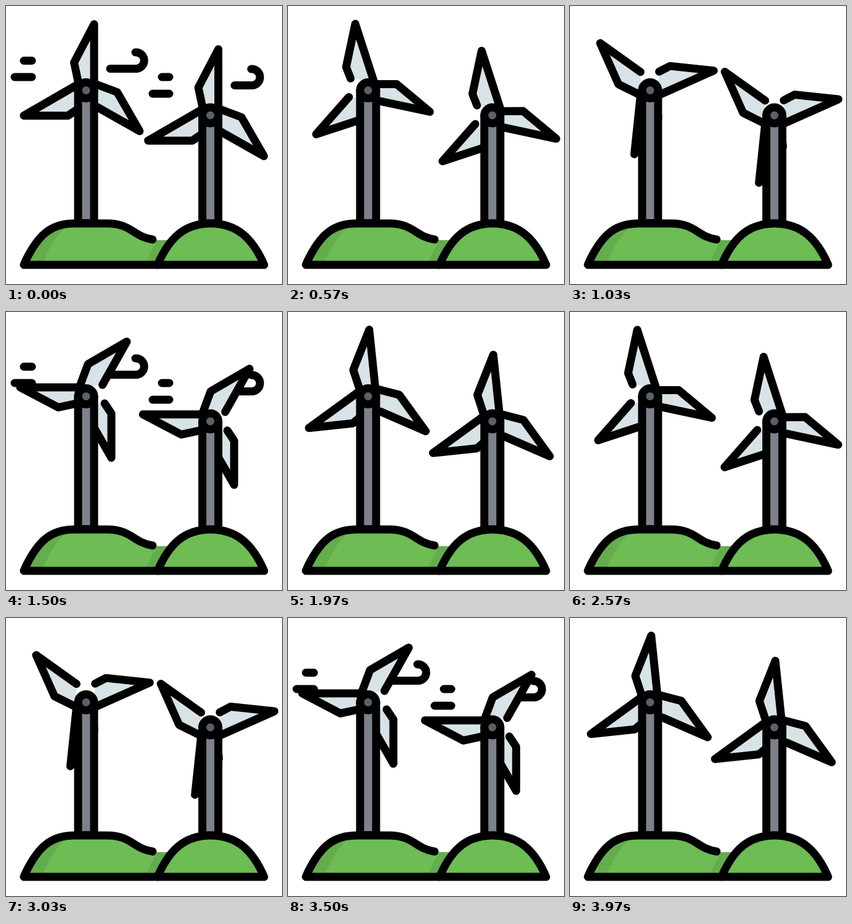
These frames come from a looping animation (448 by 450 pixels, 4010 ms). An HTML page:

```html
<!DOCTYPE html>
<html lang="en">
<head>
<meta charset="utf-8">
<title>Wind turbines</title>
<style>
html, body { margin: 0; width: 100%; height: 100%; overflow: hidden; background: #fff; }
svg { display: block; width: 448px; height: 450px; }
.line { fill: none; stroke: #000; stroke-width: 13; stroke-linecap: round; stroke-linejoin: round; }
</style>
</head>
<body>
<svg viewBox="0 0 448 450">
  <defs>
    <g id="blades" class="line" style="fill:#d8e3e7">
      <path d="M-12 -10L-19.5 -45L13 -107V-10"/>
      <path d="M17 26.5L87 66L50.5 3L13 -11"/>
      <path d="M-13 30L-29.5 41L-101 41L-16 -8"/>
    </g>
    <g id="hub" class="line">
      <circle r="13" style="fill:#59616b"/>
    </g>
  </defs>

  <g id="wind" class="line">
    <path d="M29 88.500H42M14 115H42M169 101.500H211a13 13 0 0 0 0 -26.500h-1"/>
    <path d="M253 115H265M238 142H265M371 128.500H399a13 13 0 0 0 0 -26.500h-1"/>
  </g>

  <g transform="translate(130 136.500)">
    <use id="rotorA" href="#blades"/>
    <path class="line" style="fill:#7d818b" d="M-13 0V215H13V0"/>
    <use href="#hub"/>
  </g>
  <g transform="translate(331.700 177)">
    <use id="rotorB" href="#blades"/>
    <path class="line" style="fill:#7d818b" d="M-13 0V175H13V0"/>
    <use href="#hub"/>
  </g>

  <path fill="#64ad4d" d="M29 419L33 410C52 372 72 352 111 352H165C203 352 208 374 238 379H265L250 419Z"/>
  <path fill="#6dbc54" d="M58 419C75 380 88 359 113 352H165C203 352 208 374 238 379H246Q234 397 226 419Z"/>
  <path class="line" d="M238 378C208 374 203 352 165 352H111C72 352 52 372 33 410L29 419H246"/>
  <path class="line" style="fill:#6dbc54" d="M246 419C265 375 290 352 332 352C374 352 400 375 419 419Z"/>
</svg>
<script>
const LOOP = 4010, FRAME = 100 / 3;
const [wind, rotorA, rotorB] = ['wind', 'rotorA', 'rotorB'].map(id => document.getElementById(id));
const start = performance.now();

function draw(now) {
  const t = Math.max(0, now - start) % LOOP;
  // 30 steps a second, each starting on a multiple of 10 ms
  const step = Math.min(119, Math.floor((Math.floor(t / 10) * 10 + 5) / FRAME));
  // the pivots sit slightly off the hubs
  rotorA.setAttribute('transform', `rotate(${step * 6} -0.75 -0.8)`);
  rotorB.setAttribute('transform', `rotate(${step * 6} -0.3 2.1)`);
  wind.style.visibility = step % 20 < 10 ? 'visible' : 'hidden';
  requestAnimationFrame(draw);
}
draw(start);
</script>
</body>
</html>
```
